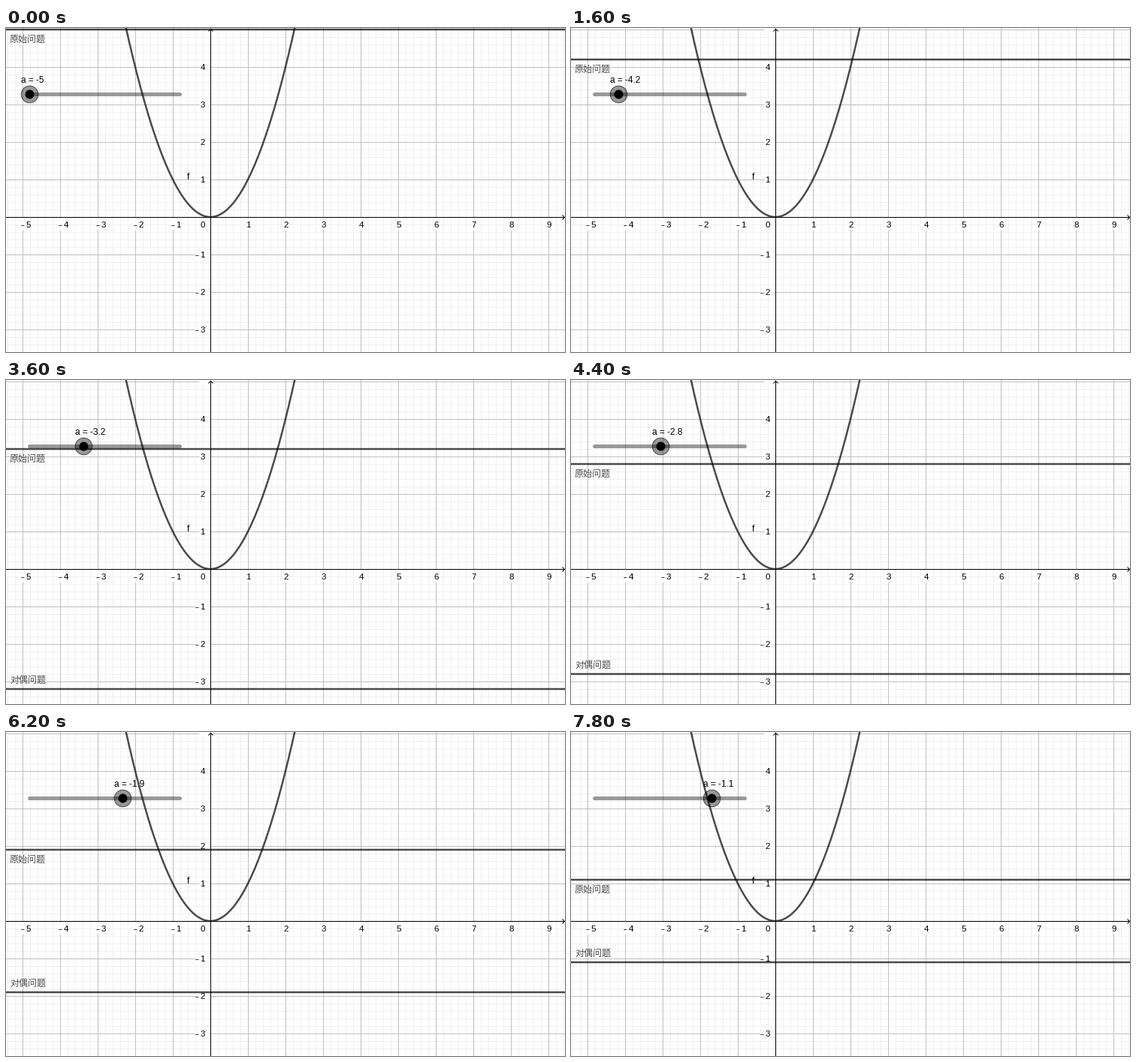
Animation of 744x432 px, one loop 8000 ms. Source, as a matplotlib script:

```python
import numpy as np
import matplotlib.pyplot as plt
from matplotlib.animation import FuncAnimation
from matplotlib.collections import LineCollection
from matplotlib.patches import Circle

W, H, DPI = 744, 432, 100
OX, OY, UNIT = 272, 252, 50
FRAMES, INTERVAL = 40, 200
PX = 72 / DPI  # one pixel in points

fig = plt.figure(figsize=(W / DPI, H / DPI), dpi=DPI, facecolor="white")
ax = fig.add_axes([0, 0, 1, 1])
ax.set_xlim(0, W)
ax.set_ylim(H, 0)
ax.axis("off")


def segments(segs, color, z):
    """One-pixel lines, centred on the pixels named by integer coordinates."""
    segs = [np.array(s) + 0.5 for s in segs]
    lines = LineCollection(segs, colors=color, linewidths=PX, zorder=z)
    lines.set_snap(False)
    ax.add_collection(lines)


def curve(x, y, width=2.5, **kw):
    return ax.plot(x, y, color="black", lw=width * PX, snap=False, **kw)[0]


def label(x, y, text, size=12, ha="left", z=8, **kw):
    kw.setdefault("family", "Liberation Sans")
    return ax.text(x, y, text, fontsize=size * PX, ha=ha, va="baseline", zorder=z, **kw)


def tick(right, base, n):
    label(right, base, str(abs(n)), 11.5, ha="right", z=4)
    if n < 0:
        label(right - 13, base - 1.3, "–", 8.5, z=4, weight="bold")


def draw_grid():
    # Major lines stop short of the axis numbers
    minor, major = [], []
    for x in range(OX % 10, W, 10):
        if (x - OX) % UNIT:
            minor.append([(x, -1), (x, H)])
        else:
            major += [[(x, -1), (x, OY)], [(x, OY + 17), (x, H)]]
    for y in range(OY % 10, H, 10):
        if (y - OY) % UNIT:
            minor.append([(-1, y), (W, y)])
        else:
            gap = 21 if y > OY else 15
            major += [[(-1, y), (OX - gap, y)], [(OX, y), (W, y)]]
    segments(minor, "#f0f0f0", 1)
    segments(major, "#c0c0c0", 2)


def draw_axes():
    segments([[(-1, OY), (W, OY)], [(OX, 1), (OX, H)]], "black", 3)
    segments([[(W - 4, OY - 3), (W - 1, OY), (W - 4, OY + 3)],
              [(OX - 3, 4), (OX, 1), (OX + 3, 4)]], "black", 3)
    for n in range(-5, 10):
        if n:
            tick(OX + n * UNIT + (11 if n < 0 else 4), 266.5, n)
    for n in range(-3, 5):
        if n:
            tick(265, OY - n * UNIT + 4.3, n)
    tick(265, 266.5, 0)


draw_grid()
draw_axes()

xs = np.linspace(-2.4, 2.4, 241)
curve(OX + xs * UNIT, OY - xs ** 2 * UNIT, alpha=0.7, zorder=5)
label(240.5, 202, "f")

# Slider
TRACK_X, TRACK_Y, STEP = 31.5, 88.5, 40
curve([TRACK_X, TRACK_X + 5 * STEP], [TRACK_Y] * 2, 5, alpha=0.4,
      solid_capstyle="round", zorder=6)
knob = Circle((TRACK_X, TRACK_Y), 11.3, fc=(0, 0, 0, 0.4), ec=(0, 0, 0, 0.6),
              lw=PX, zorder=7)
dot = Circle((TRACK_X, TRACK_Y), 6, fc="black", ec="none", zorder=7)
ax.add_patch(knob)
ax.add_patch(dot)
value = label(21, 73, "", 11.9)

cjk = dict(family="Noto Sans CJK JP", color="#4d4d4d")
primal = curve([0, W], [0, 0], alpha=0.7, zorder=5)
dual = curve([0, W], [0, 0], alpha=0.7, zorder=5)
primal_name = label(5, 0, "原始问题", **cjk)
dual_name = label(5, 0, "对偶问题", **cjk)


def update(i):
    a = (i - 50) / 10
    x = TRACK_X + (a + 5) * STEP
    knob.center = dot.center = (x, TRACK_Y)
    value.set_text(f"a = {a:g}")
    value.set_x(x - 11)

    top, bottom = OY + a * UNIT, OY - a * UNIT
    primal.set_ydata([top, top])
    dual.set_ydata([bottom, bottom])
    primal_name.set_y(top + 16.5)
    dual_name.set_y(bottom - 8)
    shown = bottom < H
    dual.set_visible(shown)
    dual_name.set_visible(shown)
    return knob, dot, value, primal, dual, primal_name, dual_name


anim = FuncAnimation(fig, update, frames=FRAMES, init_func=lambda: update(0),
                     interval=INTERVAL, repeat=True, repeat_delay=0, blit=False)
plt.show()
```
